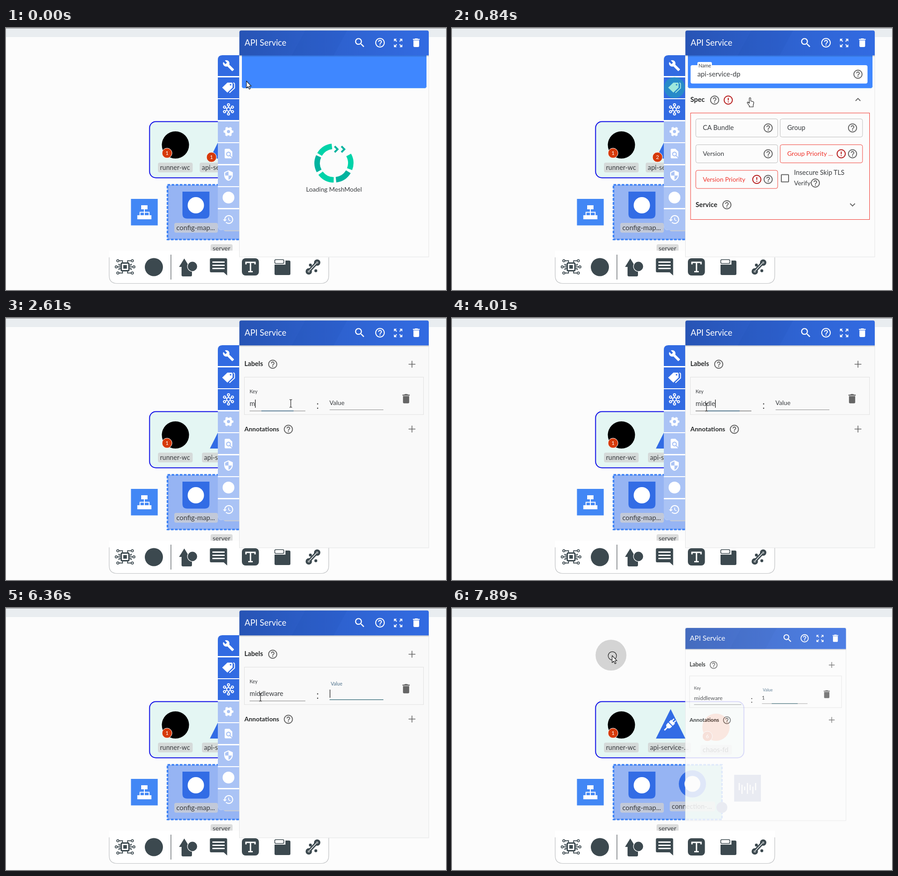
These frames come from a looping animation (970 by 578 pixels, 8000 ms). An HTML page:

```html
<!DOCTYPE html>
<html lang="en">
<head>
<meta charset="utf-8">
<title>API Service panel</title>
<style>
  html, body { margin: 0; width: 100%; height: 100%; overflow: hidden; background: #fcfcfc; }
  svg { display: block; width: 970px; height: 578px; }
  text { font-family: Lato, "Open Sans", sans-serif; fill: #3a3d40; white-space: pre; }
  .b { font-weight: 700; fill: #262829; }
  .w { fill: #fff; }
  .err { fill: #f0342c; }
  .mid { text-anchor: middle; }
</style>
</head>
<body>
<svg id="stage" viewBox="0 0 970 578" xmlns="http://www.w3.org/2000/svg"></svg>
<script>
const LOOP = 8000, STEP = 138.2;
const BLUE = '#326ce5', INK = '#3c494f', TEAL = '#3f6f8f';

const ICONS = {
  build: 'M22.7 19l-9.1-9.1c.9-2.3.4-5-1.5-6.9-2-2-5-2.4-7.4-1.3L9 6 6 9 1.6 4.7C.4 7.1.9 10.1 2.9 12.1c1.9 1.9 4.6 2.4 6.9 1.5l9.1 9.1c.4.4 1 .4 1.4 0l2.3-2.3c.5-.4.5-1.1.1-1.4z',
  find: 'M20 19.59V8l-6-6H6c-1.1 0-2 .9-2 2v16c0 1.1.9 2 2 2h12c.45 0 .85-.15 1.19-.4l-4.43-4.43c-.8.52-1.74.83-2.76.83-2.76 0-5-2.24-5-5s2.24-5 5-5 5 2.24 5 5c0 1.02-.31 1.96-.83 2.75L20 19.59zM9 13c0 1.66 1.34 3 3 3s3-1.34 3-3-1.34-3-3-3-3 1.34-3 3z',
  shield: 'M12 1L3 5v6c0 5.55 3.84 10.74 9 12 5.16-1.26 9-6.45 9-12V5l-9-4zm0 11h7c-.53 4.12-3.28 7.79-7 8.94V12H5V6.3l7-3.11V12z',
  history: 'M13 3c-4.97 0-9 4.03-9 9H1l3.9 3.9.06.13L9 12H6c0-3.87 3.13-7 7-7s7 3.13 7 7-3.13 7-7 7c-1.93 0-3.68-.79-4.94-2.06l-1.42 1.42C8.27 20 10.51 21 13 21c4.97 0 9-4.03 9-9s-4.03-9-9-9zm-1 5v5l4.28 2.54.72-1.21-3.5-2.08V8H12z',
  search: 'M15.5 14h-.79l-.28-.27C15.41 12.59 16 11.11 16 9.5 16 5.91 13.09 3 9.5 3S3 5.91 3 9.5 5.91 16 9.5 16c1.61 0 3.09-.59 4.23-1.57l.27.28v.79l5 5L20.5 19l-5-5zm-6 0C7 14 5 12 5 9.5S7 5 9.5 5 14 7 14 9.5 12 14 9.5 14z',
  help: 'M11 18h2v-2h-2v2zm1-16C6.48 2 2 6.48 2 12s4.48 10 10 10 10-4.48 10-10S17.52 2 12 2zm0 18c-4.41 0-8-3.59-8-8s3.59-8 8-8 8 3.59 8 8-3.59 8-8 8zm0-14c-2.21 0-4 1.79-4 4h2c0-1.1.9-2 2-2s2 .9 2 2c0 2-3 1.75-3 5h2c0-2.25 3-2.5 3-5 0-2.21-1.79-4-4-4z',
  alert: 'M11 15h2v2h-2zm0-8h2v6h-2zm1-5C6.48 2 2 6.48 2 12s4.48 10 10 10 10-4.48 10-10S17.52 2 12 2zm0 18c-4.42 0-8-3.58-8-8s3.58-8 8-8 8 3.58 8 8-3.58 8-8 8z',
  trash: 'M6 19c0 1.1.9 2 2 2h8c1.1 0 2-.9 2-2V7H6v12zM19 4h-3.5l-1-1h-5l-1 1H5v2h14V4z',
  expand: 'M15 3l2.3 2.3-2.9 2.9 1.4 1.4L18.7 6.7 21 9V3zM3 9l2.3-2.3 2.9 2.9 1.4-1.4L6.7 5.3 9 3H3zm6 12l-2.3-2.3 2.9-2.9-1.4-1.4L5.3 17.3 3 15v6zm12-6l-2.3 2.3-2.9-2.9-1.4 1.4 2.9 2.9L15 21h6z',
  up: 'M12 8l-6 6 1.4 1.4L12 10.8l4.6 4.6L18 14z',
  down: 'M16.6 8.6L12 13.2 7.4 8.6 6 10l6 6 6-6z',
  plus: 'M19.5 12.8h-6.7v6.7h-1.6v-6.7H4.5v-1.6h6.7V4.5h1.6v6.7h6.7z',
  box: 'M19 5v14H5V5h14m0-2H5c-1.1 0-2 .9-2 2v14c0 1.1.9 2 2 2h14c1.1 0 2-.9 2-2V5c0-1.1-.9-2-2-2z'
};

const icon = (name, x, y, fill = '#666', k = 1) =>
  `<path d="${ICONS[name]}" fill="${fill}" transform="translate(${x - 12 * k} ${y - 12 * k}) scale(${k})"/>`;
const text = (x, y, size, str, attrs = '') => `<text x="${x}" y="${y}" font-size="${size}" ${attrs}>${str}</text>`;
const rect = (x, y, x2, y2, fill, attrs = '') =>
  `<rect x="${x}" y="${y}" width="${x2 - x}" height="${y2 - y}" fill="${fill}" ${attrs}/>`;
const disc = (x, y, r, fill, attrs = '') => `<circle cx="${x}" cy="${y}" r="${r}" fill="${fill}" ${attrs}/>`;
const path = (d, attrs) => `<path d="${d}" ${attrs}/>`;
const group = (id, body, attrs = '') => `<g id="${id}" ${attrs}>${body}</g>`;
const chip = (x, x2, y, str, size) =>
  rect(x, y, x2, y + 21.5, '#d0d0d0', 'opacity=".75" rx="4"') + text(x + 4.5, y + 15.5, size, str);
const badge = (x, y, id, n) =>
  disc(x, y, 11, '#d63a0a', 'stroke="#fff"') + text(x, y + 4.2, 12, n, `id="${id}" class="w mid"`);

function canvas() {
  const boxes = [290, 300, 310].map(x => rect(x - .5, 413, x + 10.5, 422, '#fff')).join('');
  return rect(0, 0, 970, 20, '#e9edf0') + rect(0, 0, 970, 1, '#8b8e90') +
    rect(316.5, 206.5, 643.5, 330.5, '#e4f6f3', 'rx="14" stroke="#0a0ae6" stroke-width="2"') +
    disc(373.5, 258, 30, '#000') + badge(355, 276, 'b1', '1') + chip(335, 411.5, 297, 'runner-wc', 14.6) +
    path('M482 223L514.5 288H449.5Z', `fill="${BLUE}"`) +
    `<g transform="translate(481 257) rotate(45)" fill="#fff"><path d="M-6-9H6V-2H-6ZM-4-15h2.4v6H-4ZM1.6-15H4v6H1.6ZM-6 0H6V4Q6 9 0 10Q-6 9-6 4ZM-1.5 9h3v9h-3Z"/></g>` +
    group('apiLong', chip(427, 533, 297, 'api-service-dp', 15)) +
    group('apiShort', chip(432, 527, 297, 'api-service-...', 14.6)) +
    group('apiBadge', badge(453, 285, 'b2', '1')) +
    disc(582, 263, 30, '#ee6a35') + badge(563, 283, 'b3', '6') + chip(548, 617, 302, 'chaos-fd', 15) +
    rect(275.5, 377, 334.5, 435.5, '#4287f5') + rect(298, 391, 312, 400, '#fff') + boxes +
    path('M305 399V414M295.5 414V406.5H315.5V414', 'fill="none" stroke="#fff" stroke-width="2"') +
    rect(356, 346, 595, 467, '#96b4f3') + rect(514, 346, 595, 467, '#9fdad2') +
    rect(356, 346, 595, 466.5, 'none', 'stroke="#3f83f5" stroke-width="3.6" stroke-dasharray="6 3"') +
    path('M389 361H448.5V410Q448.5 420.5 438 420.5H399.5Q389 420.5 389 410Z', `fill="${BLUE}"`) +
    disc(418.5, 391, 18, '#fff') + chip(371, 467, 430, 'config-map...', 15.1) +
    disc(530, 388, 30, BLUE) + disc(530, 388, 17.5, '#fff') + chip(480, 580, 427, 'connection-...', 14.8) +
    disc(595, 440, 12, '#7888b5') + rect(622, 368, 681, 427, '#7888b5') +
    [632, 638, 644, 650, 656, 662, 668].map((x, i) =>
      rect(x, 386 + i % 3 * 4, x + 2.5, 402 + i % 2 * 8, '#fff')).join('') +
    rect(451, 477, 499.5, 499, '#dbdcdc', 'rx="4"') + text(455.5, 491, 14.3, 'server');
}

function toolbar() {
  const ring = (x, y) => disc(x, y, 2.4, '#fff', `stroke="${INK}" stroke-width="1.7"`);
  const arms = [0, 180].map(a => `<g transform="rotate(${a} 262.5 527)">` +
    path('M257 518V513.5H248M268 518V513.5H277M253 523H249V520M272 523H276V520M253 527H246', `fill="none" stroke="${INK}" stroke-width="1.8"`) +
    ring(246.5, 513.5) + ring(278.5, 513.5) + ring(243, 527) + '</g>').join('');
  return path('M227 491H712V546Q712 564 694 564H245Q227 564 227 546Z', 'fill="#fff"') +
    path('M227.5 506V546Q227.5 563.5 245 563.5H694Q711.5 563.5 711.5 546V506', 'fill="none" stroke="#bfc1c3" stroke-width="1.2"') +
    arms + rect(254, 518.5, 271, 535.5, '#fff', `stroke="${INK}" stroke-width="3" rx="2"`) + rect(258.5, 523, 266.5, 531, INK) +
    disc(326, 527.5, 20, INK) + rect(363, 500, 364.2, 555, '#4a5256') +
    path('M393 508.5L404.5 527H381.5Z', `fill="${INK}"`) + rect(387, 525, 410, 548, INK, 'rx="3"') +
    disc(411, 526, 11, INK, 'stroke="#fff" stroke-width="1.2"') +
    path('M452 508H485Q487.5 508 487.5 511V546L480 539H452Q449.5 539 449.5 536V511Q449.5 508 452 508Z', `fill="${INK}"`) +
    path('M455 516.5H482M455 523.5H482M455 530.5H482', 'stroke="#fff" stroke-width="3"') +
    rect(520, 508, 557.5, 546, INK, 'rx="8"') +
    path('M529 521.5V517H549V521.5M539 517V537.5M534 537.5H544', 'fill="none" stroke="#fff" stroke-width="3"') +
    path('M592 522H616V513H624Q627 513 627 516V542Q627 545 624 545H595Q592 545 592 542Z', `fill="${INK}"`) +
    rect(592.5, 511, 612.5, 519.5, '#fff', `rx="2.5" stroke="${INK}" stroke-width="1.6"`) +
    path('M685 518L668 536', `stroke="${INK}" stroke-width="7"`) + disc(686, 517.5, 7, INK) + disc(667.5, 537, 7, INK) +
    path('M684 519L669 535', 'stroke="#fff" stroke-width="1.4"') + disc(686, 517.5, 2.5, '#9aa1a4') + disc(667.5, 537, 2.5, '#9aa1a4') +
    disc(671, 523, 3.2, INK) + disc(683, 535.5, 3.2, INK);
}

function sidebar() {
  const tops = [...Array(8).keys()].map(i => Math.round(60 + 48.5 * i));
  const tiles = tops.map((y, i) => rect(467, y, 514.5, y + 46, i < 3 ? '#326be2' : '#aac3f5')).join('');
  const spokes = [0, 60, 120, 180, 240, 300].map(a => `<g transform="rotate(${a} 490.5 179.5)">` +
    path('M490.5 179.5V170', 'stroke="#fff" stroke-width="2"') + disc(490.5, 169.5, 2.4, '#326be2', 'stroke="#fff" stroke-width="2"') + '</g>').join('');
  return '<clipPath id="bar"><path d="M514.5 60H477Q467 60 467 70V436Q467 446 477 446H514.5Z"/></clipPath>' +
    `<g clip-path="url(#bar)">${rect(467, 60, 514.5, 446, '#fff')}${tiles}</g>` +
    icon('build', 490.5, 83, '#fff', 1.1) + disc(490.5, 131.5, 23, '#1fa5b4', 'id="ripple" opacity=".55"') +
    group('tag', path('M488 120.5H497.5Q499.5 120.5 499.5 122.5V131.5L488 142.5 476.5 131.5ZM495 123.4a1.7 1.7 0 1 0 .1 0Z', 'fill-rule="evenodd"') +
      path('M501.5 120.5L503.8 123V132.5L492.5 143', 'fill="none" stroke="currentColor" stroke-width="1.9"')) +
    spokes + disc(490.5, 179.5, 4, '#326be2', 'stroke="#fff" stroke-width="2.2"') +
    disc(490.5, 228.5, 6, 'none', 'stroke="#fff" stroke-width="5"') +
    disc(490.5, 228.5, 9.3, 'none', 'stroke="#fff" stroke-width="3" stroke-dasharray="5 4.74" stroke-dashoffset="2.5"') +
    icon('find', 490.5, 277, '#fff', 1.05) + icon('shield', 490.5, 325.5, '#fff', 1.05) +
    disc(490.5, 374, 13, '#fff') + icon('history', 490, 422.5, '#fff', 1.08);
}

function spinner() {
  const at = a => [723 + 37 * Math.cos(a * Math.PI / 180), 298 + 37 * Math.sin(a * Math.PI / 180)].map(v => v.toFixed(1)).join(' ');
  const arcs = [-29, 31, 91, 152, 211].map((a, i) =>
    path(`M${at(a)}A37 37 0 0 1 ${at(a + (i ? 52 : 50))}`, `fill="none" stroke="${i % 2 ? '#00b39f' : '#00d3a9'}" stroke-width="12"`)).join('');
  return arcs + path('M724.5 261L731 267.5 724.5 274M739.5 261L746 267.5 739.5 274', 'fill="none" stroke="#00b39f" stroke-width="4"') +
    text(723, 361, 13.8, 'Loading MeshModel', 'class="mid"');
}

function field(x, y, label, size, bad) {
  const w = x < 600 ? 181 : 182;
  return rect(x + .5, y + .5, x + w, y + 40.5, 'none', `rx="4" stroke="${bad ? '#f0423a' : '#bdbdbd'}"`) +
    text(x + 16, y + 25, size, label, bad ? 'class="err"' : '') +
    (bad ? icon('alert', x + 135, y + 20.5, '#b71c1c') : '') + icon('help', x + 160, y + 20.5);
}

function form() {
  return rect(526, 82, 916, 122.5, '#fff', 'rx="4"') + rect(541, 75, 573, 90, '#fff', 'rx="3"') +
    text(543.5, 86.5, 10.7, 'Name') + text(541, 107, 15.2, 'api-service-dp') + icon('help', 895, 102) +
    text(525.5, 162.5, 15, 'Spec', 'class="b"') + icon('help', 579, 159) + icon('alert', 609, 159, '#b71c1c') + icon('up', 895, 158) +
    rect(526, 187.5, 920.5, 422.5, 'none', 'stroke="#f0342c"') +
    field(537, 200, 'CA Bundle', 14.7) + field(723, 200, 'Group', 14.5) +
    field(537, 257, 'Version', 14.3) + field(723, 257, 'Group Priority ...', 14, 1) +
    field(537, 313.5, 'Version Priority', 13.8, 1) +
    icon('box', 734, 331.5) + text(754, 324, 14.5, 'Insecure Skip TLS') + text(754, 347, 14, 'Verify') + icon('help', 801, 342) +
    text(537, 394.5, 14.8, 'Service', 'class="b"') + icon('help', 606, 390) + icon('down', 883, 390);
}

function labels() {
  return text(525.5, 106, 14.6, 'Labels', 'class="b"') + icon('help', 588, 102) + icon('plus', 895, 102) +
    group('row', rect(525.5, 130.5, 920.5, 213, 'none', 'stroke="#e0e0e0"') +
      text(537, 166, 10.6, 'Key', 'id="keyLabel"') + text(537, 193.5, 14.6, '', 'id="key"') +
      rect(537, 204.5, 660, 205.6, '#8a8a8a', 'id="keyLine"') + rect(563, 204.3, 634, 205.7, TEAL, 'id="keyFocus"') +
      disc(687, 189.5, 1.3, '#333') + disc(687, 199, 1.3, '#333') +
      text(713, 192, 13.7, 'Value', 'id="valLabel"') + text(713, 192, 14.5, '1', 'id="val"') +
      rect(713.5, 202, 832, 203, '#8a8a8a') + rect(713.5, 201.7, 832, 203, '#2f6674', 'id="valFocus"') +
      rect(0, 180, 1.2, 198, '#111', 'id="caret"') + icon('trash', 882, 178, '#666', 1.14)) +
    group('notes', text(525.5, 250, 14, 'Annotations', 'class="b"') + icon('help', 622.5, 245.5) + icon('plus', 895, 245));
}

function panel() {
  return rect(514.5, 5.5, 932, 505, '#fcfcfc', 'id="sheet" stroke="#e3e4e5"') +
    group('strip', path('M520 58H927V128Q927 133 922 133H525Q520 133 520 128Z', 'fill="#3f87ff"') +
      path('M520 128Q520 132.5 525 132.5H922Q927 132.5 927 128', 'fill="none" stroke="#6aa9f5"')) +
    rect(514.5, 60.5, 932, 64, 'url(#shade)') +
    path('M514.5 60.5V9.5Q514.5 5.5 519 5.5H928Q932 5.5 932 9.5V60.5Z', 'fill="url(#head)"') +
    path('M660 5.5H752L722 60.5H630Z', 'fill="#1c49a8" opacity=".12"') +
    text(526, 39.2, 18.4, 'API Service', 'class="w"') +
    icon('search', 780, 32.5, '#fff', 1.15) + icon('help', 824.5, 32.5, '#fff', 1.05) +
    icon('expand', 864.5, 33, '#fff', 1.02) + icon('trash', 904.5, 32.5, '#fff', 1.05) +
    group('load', spinner()) + group('form', form()) + group('labels', labels());
}

function pointers() {
  const edge = 'fill="#fff" stroke="#111" stroke-width="1.1" stroke-linejoin="round"';
  return group('press', disc(350.5, 104, 34, '#000', 'opacity=".16"') + disc(353.5, 105.5, 9.2, 'none', 'stroke="#222" stroke-width="1.2"')) +
    group('pointer', path('M0 0V15.5L3.6 12.2 6.2 18 8.6 17 6.1 11.3H10.8Z', `id="arrow" ${edge}`) +
      path('M-1.6 1C-1.6-.6 1.6-.6 1.6 1V7L7 8.5Q8.6 9 8.2 11.5L7 16V20H-1.6V17.5L-6 11.5C-6.6 9.5-5 8.8-3.6 10L-1.6 12Z', `id="hand" ${edge}`) +
      path('M-3-8.5H-1L0-7.5 1-8.5H3M0-7.5V7.5M-3 8.5H-1L0 7.5 1 8.5H3', 'id="beam" fill="none" stroke="#222" stroke-width="1.2"'));
}

const stage = document.getElementById('stage');
stage.innerHTML = `<defs>
  <linearGradient id="head"><stop offset="0" stop-color="#2754b5"/><stop offset=".55" stop-color="#2e62d0"/><stop offset="1" stop-color="#326be2"/></linearGradient>
  <linearGradient id="shade" x2="0" y2="1"><stop stop-color="#000" stop-opacity=".22"/><stop offset="1" stop-color="#000" stop-opacity="0"/></linearGradient>
  </defs>` + canvas() + toolbar() + group('side', sidebar()) + group('panel', panel()) + pointers();

const el = {};
stage.querySelectorAll('[id]').forEach(n => el[n.id] = n);
const show = (id, on) => el[id].style.display = on ? '' : 'none';
const set = (id, attrs) => Object.entries(attrs).forEach(([k, v]) => el[id].setAttribute(k, v));

const WORD = 'middleware';
const KEYS = [1500, 3425, 3565, 3705, 3845, 4000, 4125, 4255, 4535, 4675];
// step, x, y
const ROUTE = [[0, 530, 117], [2, 500, 128], [4, 490, 131], [6, 657, 154], [8, 892, 99], [9, 893, 100],
  [11, 898, 146], [16, 828, 163], [20, 561, 197], [52, 561, 197], [56, 356, 109], [57, 353, 105]];

function locate(s) {
  const i = ROUTE.findIndex(p => p[0] >= s);
  if (i < 0) return ROUTE[ROUTE.length - 1].slice(1);
  if (i === 0) return ROUTE[0].slice(1);
  const [a, ax, ay] = ROUTE[i - 1], [b, bx, by] = ROUTE[i];
  const k = (s - a) / (b - a);
  return [ax + (bx - ax) * k, ay + (by - ay) * k];
}

function draw(t) {
  const between = (a, b) => t >= a && t < b;
  const inKey = between(1370, 5230), inVal = t >= 5230, closing = t >= 7880;
  const meta = t >= 965, row = t >= 1225;

  show('load', t < 125);
  show('form', between(125, 965));
  show('strip', !meta);
  show('labels', meta);
  show('row', row);
  set('notes', { transform: row ? '' : 'translate(0 -95)' });
  set('sheet', { height: meta ? 501.5 : 499.5, fill: meta && !closing ? '#f9f9f9' : '#fcfcfc' });

  el.b2.textContent = t < 125 ? 1 : 2;
  show('apiBadge', t < 1765);
  show('apiLong', t < 1500);
  show('apiShort', t >= 1500);

  const lit = between(410, 965);
  show('ripple', lit);
  set('tag', { fill: lit ? '#9fe8dc' : '#fff', color: lit ? '#9fe8dc' : '#fff' });

  el.key.textContent = WORD.slice(0, KEYS.filter(k => t >= k).length);
  const floated = t >= 1370;
  set('keyLabel', { y: floated ? 166 : 192, 'font-size': floated ? 10.6 : 13.7 });
  el.keyLabel.style.fill = between(5100, 5500) ? TEAL : '';
  const leaving = between(5100, 5500), hover = between(2735, 5100);
  set('keyLine', { height: leaving ? 1.6 : 1.1, fill: leaving ? '#26292b' : hover ? '#555' : '#8a8a8a' });
  show('keyFocus', between(1370, 5500));

  const rise = inVal ? (t < 5380 ? .45 : 1) : 0;
  const phase = Math.ceil(rise * 2);
  set('valLabel', { x: inVal ? 716 : 713, y: [192, 184.5, 170.5][phase], 'font-size': [13.7, 12.3, 10.5][phase] });
  el.valLabel.style.fill = rise === 1 ? '#4a6f8a' : '';
  show('val', t >= 6755);
  show('valFocus', inVal);
  const span = 118.5 * (closing ? .57 : rise);
  set('valFocus', { x: 772.7 - span / 2, width: span });

  const blinkOff = between(2035, 2570) || between(3035, 3425) || between(5785, 6355) || t >= 6755;
  show('caret', (inKey || inVal) && !blinkOff);
  set('caret', { x: inVal ? 713.7 : 537 + (el.key.textContent ? el.key.getComputedTextLength() : 0) });

  show('side', !closing);
  set('panel', closing ? { opacity: .86, transform: 'translate(514.5 258) scale(.848) translate(-514.5 -258)' } : { opacity: 1, transform: '' });

  const [x, y] = locate(Math.floor((t + 15) / STEP));
  const beam = x > 537 && x < 660 && y > 170, hand = between(400, 1080);
  set('pointer', { transform: `translate(${x.toFixed(1)} ${y.toFixed(1)})` });
  show('beam', beam);
  show('hand', hand && !beam);
  show('arrow', !hand && !beam);
  show('press', closing);
}

const start = performance.now();
function tick() {
  draw((performance.now() - start) % LOOP);
  requestAnimationFrame(tick);
}
tick();
</script>
</body>
</html>
```
